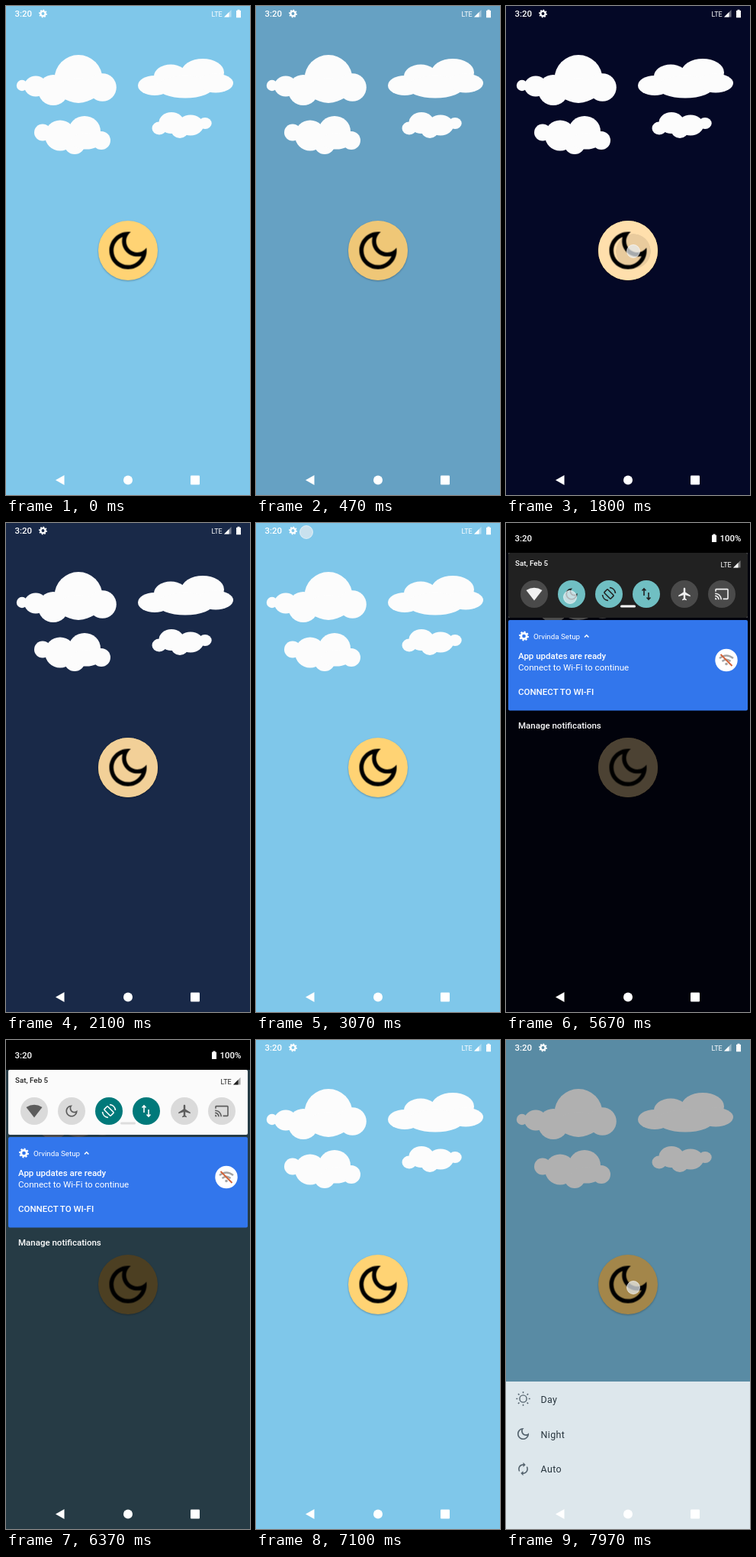
Recreate the animation shown at these times as an HTML page without scripts. Size 320 by 640 pixels, loop 8 s.

```html
<!DOCTYPE html>
<html lang="en">
<head>
<meta charset="utf-8">
<title>Day and night theme</title>
<style>
  html, body { margin: 0; height: 100%; overflow: hidden; background: #7fc7ea; }
  svg { display: block; width: 100vw; height: 100vh; }
  text { font-family: Roboto, sans-serif; font-size: 11.5px; fill: currentColor; }
  .medium { font-weight: 500; }
  .small { font-size: 9.8px; }
  .lte { font-size: 9px; }
  .line { fill: none; stroke-width: 1.6; }
  .white { fill: #fff; color: #fff; }

  .night, .scrim, .status, .header, .notices, .dim, .sheet, .touch, .ripple {
    animation: 8s linear infinite;
  }

  /* Theme */
  .night { animation-name: night; }
  @keyframes night {
    0%, 5%, 30.375%, 53.75%, 79.125%, 100% { opacity: 0; }
    9.5%, 25.375%, 58.25%, 74.125% { opacity: 1; }
  }
  .light {
    --panel: #fbfbfb; --ink: #222; --handle: #ddd;
    --off: #dadada; --offIcon: #5c5c5c; --on: #00797a; --onIcon: #fff;
    --moon: #dadada; --moonIcon: #5c5c5c;
  }
  .dark {
    --panel: #212121; --ink: #fff; --handle: #fff;
    --off: #4a4a4a; --offIcon: #f0f0f0; --on: #70bfc3; --onIcon: #222;
    --moon: #70bfc3; --moonIcon: #222;
  }
  .off { fill: var(--off); }
  .on { fill: var(--on); }
  .offIcon { fill: var(--offIcon); }

  /* Notification shade */
  .scrim { animation-name: scrim; }
  @keyframes scrim {
    0%, 39.2%, 88.6%, 100% { opacity: 0; }
    44%, 84.3% { opacity: .7; }
  }
  .status { animation-name: status; }
  @keyframes status {
    0%, 39.2%, 88.6%, 100% { opacity: 1; }
    41%, 86.5% { opacity: 0; }
  }
  .header { animation-name: header; }
  @keyframes header {
    0%, 39.2% { transform: translateY(-130px); animation-timing-function: ease-out; }
    43.5%, 84.2% { transform: none; animation-timing-function: ease-in-out; }
    88.6%, 100% { transform: translateY(-130px); }
  }
  .notices { animation-name: notices; }
  @keyframes notices {
    0%, 39.2% { transform: translateY(-275px); opacity: 0; animation-timing-function: ease-out; }
    44.4%, 84.2% { transform: none; opacity: 1; animation-timing-function: ease-in-out; }
    88.6%, 100% { transform: translateY(-275px); opacity: 0; }
  }

  /* Bottom sheet */
  .dim { animation-name: dim; }
  @keyframes dim {
    0%, 98.2% { opacity: 0; }
    99.6%, 100% { opacity: .3; }
  }
  .sheet { animation-name: sheet; color: #1d2126; }
  .sheet text { font-size: 12.45px; letter-spacing: .03em; }
  @keyframes sheet {
    0%, 98.2% { transform: translateY(102px); opacity: 0; animation-timing-function: ease-in; }
    99.6%, 100% { transform: none; opacity: .8; }
  }

  /* Finger */
  .touch {
    animation-name: touch; animation-timing-function: step-end;
    fill: #e6ecf0; fill-opacity: .72; stroke: #fff; stroke-opacity: .6;
  }
  @keyframes touch {
    0% { opacity: 0; transform: translate(167px, 321px); }
    2.4%, 22.4% { opacity: 1; }
    4.2%, 24.2% { opacity: 0; }
    30% { transform: translate(66px, 12px); }
    38.3% { opacity: 1; }
    39% { transform: translate(66px, 12px); animation-timing-function: ease-in; }
    42% { opacity: 0; transform: translate(72px, 300px); }
    45% { transform: translate(75px, 96px); }
    50.8% { opacity: 1; }
    52.4% { opacity: 0; }
    60% { transform: translate(84px, 97px); }
    70.8% { opacity: 1; }
    72.4% { opacity: 0; }
    80% { transform: translate(167px, 324px); }
    92.4%, 100% { opacity: 1; transform: translate(167px, 324px); }
  }
  .ripple { animation-name: ripple; transform-origin: 167px 321px; }
  @keyframes ripple {
    0%, 2.39%, 22.39%, 92.39% { opacity: 0; transform: scale(.45); }
    2.4%, 22.4%, 92.4% { opacity: .09; transform: scale(.45); }
    5%, 25% { opacity: .09; transform: none; }
    8%, 28% { opacity: 0; transform: none; }
    94.1%, 100% { opacity: .09; transform: none; }
  }
</style>
</head>
<body>
<svg viewBox="0 0 320 640" preserveAspectRatio="none">
  <defs>
    <clipPath id="fabClip"><circle cx="160" cy="320" r="39"/></clipPath>

    <path id="moon" transform="translate(-12 -12)" fill-rule="evenodd" d="M9.37 5.51C9.19 6.15 9.1 6.82 9.1 7.5c0 4.08 3.32 7.4 7.4 7.4.68 0 1.35-.09 1.99-.27C17.45 17.19 14.93 19 12 19c-3.86 0-7-3.14-7-7 0-2.93 1.81-5.45 4.37-6.49zM12 3c-4.97 0-9 4.03-9 9s4.03 9 9 9 9-4.03 9-9c0-.46-.04-.92-.1-1.36-.98 1.37-2.58 2.26-4.4 2.26-2.98 0-5.4-2.42-5.4-5.4 0-1.81.89-3.42 2.26-4.4-.44-.06-.9-.1-1.36-.1z"/>

    <g id="gear" fill="none" stroke="#fff">
      <circle r="3.1" stroke-width="2.3"/>
      <circle r="4.5" stroke-width="1.8" pathLength="16" stroke-dasharray="1"/>
    </g>
    <g id="signal" fill="currentColor">
      <path d="M0 0H-9.5L0-9.5z" opacity=".4"/>
      <path d="M-3 0H-9.5L-3-6.5z"/>
    </g>
    <path id="battery" d="M-3-4H-1.5V-5.3H1.5V-4H3V5.3H-3z" fill="#fff"/>
    <circle id="tile" r="18"/>

    <g id="quickPanel" color="var(--ink)">
      <rect x="3" y="39" width="314" height="85" rx="2" fill="var(--panel)"/>
      <text class="small medium" x="12" y="56">Sat, Feb 5</text>
      <text class="lte" x="281.5" y="58">LTE</text>
      <use href="#signal" x="307.5" y="58.5"/>
      <rect x="150" y="107.5" width="20" height="3" rx="1.5" fill="var(--handle)"/>
      <g transform="translate(37 93)">
        <use href="#tile" class="off"/>
        <path class="offIcon" d="M-10.5-5Q0-11.5 10.5-5L0 8.5z"/>
      </g>
      <g transform="translate(86 93)">
        <use href="#tile" fill="var(--moon)"/>
        <use href="#moon" fill="var(--moonIcon)" transform="scale(.84)"/>
      </g>
      <g transform="translate(135 93)">
        <use href="#tile" class="on"/>
        <g class="line" stroke="var(--onIcon)">
          <rect x="-3.2" y="-6" width="6.4" height="12" rx="1" transform="rotate(-45)"/>
          <path d="M1-8.5A8.5 8.5 0 0 1 8.5-1M-1 8.5A8.5 8.5 0 0 1-8.5 1"/>
        </g>
      </g>
      <g transform="translate(184 93)">
        <use href="#tile" class="on"/>
        <path class="line" stroke="var(--onIcon)" d="M-3 2V-7M-5.5-4.5L-3-7L-.5-4.5M3-2V7M.5 4.5L3 7L5.5 4.5"/>
      </g>
      <g transform="translate(234 93)">
        <use href="#tile" class="off"/>
        <path class="offIcon" transform="scale(.82) translate(-11.5 -12)" d="M21 16v-2l-8-5V3.5c0-.83-.67-1.5-1.5-1.5S10 2.67 10 3.5V9l-8 5v2l8-2.5V19l-2 1.5V22l3.5-1 3.5 1v-1.5L13 19v-5.5l8 2.5z"/>
      </g>
      <g transform="translate(283 93)">
        <use href="#tile" class="off"/>
        <path class="offIcon" transform="scale(.8) translate(-12 -12)" d="M21 3H3c-1.1 0-2 .9-2 2v3h2V5h18v14h-7v2h7c1.1 0 2-.9 2-2V5c0-1.1-.9-2-2-2zM1 18v3h3c0-1.66-1.34-3-3-3zm0-4v2c2.76 0 5 2.24 5 5h2c0-3.87-3.13-7-7-7zm0-4v2c4.97 0 9 4.03 9 9h2c0-6.08-4.93-11-11-11z"/>
      </g>
    </g>
  </defs>

  <!-- Sky -->
  <rect width="320" height="640" fill="#7fc7ea"/>
  <rect class="night" width="320" height="640" fill="#040826"/>
  <g fill="#fcfcfc">
    <circle cx="21" cy="104" r="7.2"/>
    <ellipse cx="39" cy="105" rx="15" ry="13.5"/>
    <ellipse cx="62" cy="110" rx="20" ry="20"/>
    <circle cx="95" cy="95.5" r="31.5"/>
    <ellipse cx="95" cy="110" rx="28" ry="15.5"/>
    <circle cx="126.5" cy="106.5" r="18.3"/>

    <ellipse cx="195" cy="104" rx="22" ry="13"/>
    <ellipse cx="216" cy="92" rx="22" ry="15.5"/>
    <ellipse cx="258" cy="87" rx="28" ry="18"/>
    <ellipse cx="235" cy="106" rx="37" ry="14.5"/>
    <ellipse cx="275" cy="101" rx="23" ry="12.5"/>

    <circle cx="48" cy="165.5" r="11"/>
    <ellipse cx="71" cy="169.5" rx="20" ry="20"/>
    <ellipse cx="103" cy="164" rx="21" ry="20"/>
    <ellipse cx="90" cy="182" rx="13" ry="12"/>
    <ellipse cx="105" cy="177" rx="20" ry="10.5"/>
    <circle cx="125" cy="176" r="12"/>

    <ellipse cx="201" cy="160" rx="9.5" ry="8.5"/>
    <ellipse cx="217" cy="153" rx="16.5" ry="14"/>
    <ellipse cx="228" cy="163" rx="11" ry="10"/>
    <ellipse cx="242" cy="156" rx="17" ry="13.5"/>
    <ellipse cx="261" cy="153.5" rx="8.7" ry="7.5"/>
  </g>

  <!-- Round button -->
  <circle cx="160" cy="320" r="39" fill="#ffd374" style="filter: drop-shadow(0 1px 1px rgba(0,0,0,.28))"/>
  <circle class="night" cx="160" cy="320" r="39" fill="#ffdfac"/>
  <use href="#moon" transform="translate(160 320) scale(2.72)"/>
  <g clip-path="url(#fabClip)">
    <circle class="ripple" cx="167" cy="321" r="48"/>
  </g>

  <!-- Bottom sheet -->
  <rect class="dim" width="320" height="640"/>
  <g class="sheet">
    <rect y="447" width="320" height="220" fill="#fff"/>
    <g transform="translate(22.5 469.5)" class="line" stroke="#555b62">
      <circle r="4.6" stroke-width="1.4"/>
      <circle r="8.2" stroke-width="2" pathLength="32" stroke-dasharray="1 3" stroke-dashoffset=".5"/>
    </g>
    <g fill="#555b62">
      <use href="#moon" transform="translate(22.5 515.5) scale(.84)"/>
      <path transform="translate(22.5 561.5) scale(.8) translate(-12 -12)" d="M12 6v3l4-4-4-4v3c-4.42 0-8 3.58-8 8 0 1.57.46 3.03 1.24 4.26L6.7 14.8c-.45-.83-.7-1.79-.7-2.8 0-3.31 2.69-6 6-6zm6.76 1.74L17.3 9.2c.44.84.7 1.79.7 2.8 0 3.31-2.69 6-6 6v-3l-4 4 4 4v-3c4.42 0 8-3.58 8-8 0-1.57-.46-3.03-1.24-4.26z"/>
    </g>
    <text x="45.5" y="474.5">Day</text>
    <text x="45.5" y="520.5">Night</text>
    <text x="45.5" y="566">Auto</text>
  </g>

  <!-- Status bar -->
  <g class="status white">
    <text class="medium" x="11.5" y="14">3:20</text>
    <use href="#gear" x="48.5" y="10"/>
    <text class="lte" x="269.5" y="13.5">LTE</text>
    <use href="#signal" x="295.5" y="14.5"/>
    <use href="#battery" x="305" y="10"/>
  </g>

  <!-- Notification shade -->
  <rect class="scrim" width="320" height="640"/>
  <g class="notices white">
    <rect x="3" y="127" width="314" height="118.5" rx="2" fill="#3276ec"/>
    <use href="#gear" transform="translate(23.5 148) scale(1.2)"/>
    <text class="small" x="36" y="151.5">Orvinda Setup</text>
    <path class="line" stroke="#fff" stroke-width="1.2" d="M103 149.5L105.7 146.8L108.4 149.5"/>
    <text class="medium" x="16" y="177.5">App updates are ready</text>
    <text x="16" y="193" style="font-size: 11.6px">Connect to Wi-Fi to continue</text>
    <text class="medium" x="16" y="225">CONNECT TO WI-FI</text>
    <text class="medium" x="16" y="269">Manage notifications</text>
    <g transform="translate(289 179.5)">
      <circle r="14.7"/>
      <path class="line" stroke="#a5a5a5" style="stroke-width: 2.4" d="M-9-2.5Q0-9.5 9-2.5M-5.5 1.5Q0-3 5.5 1.5"/>
      <circle cy="5" r="1.8" fill="#a5a5a5"/>
      <path class="line" stroke="#d2633a" style="stroke-width: 2" d="M-7.5-7.5L7.5 7.5"/>
    </g>
  </g>
  <g class="header">
    <rect width="320" height="39"/>
    <g class="white">
      <text class="medium" x="11.5" y="24">3:20</text>
      <use href="#battery" x="273" y="19.7"/>
      <text class="medium" x="280.5" y="24">100%</text>
    </g>
    <use href="#quickPanel" class="light"/>
    <use href="#quickPanel" class="dark night"/>
  </g>

  <!-- Navigation bar -->
  <g class="white">
    <path d="M65 620.5L76.5 614V627z"/>
    <circle cx="160" cy="620.5" r="6"/>
    <rect x="242" y="614.5" width="12" height="12" rx="1"/>
  </g>

  <circle class="touch" r="8.5"/>
</svg>
</body>
</html>
```
